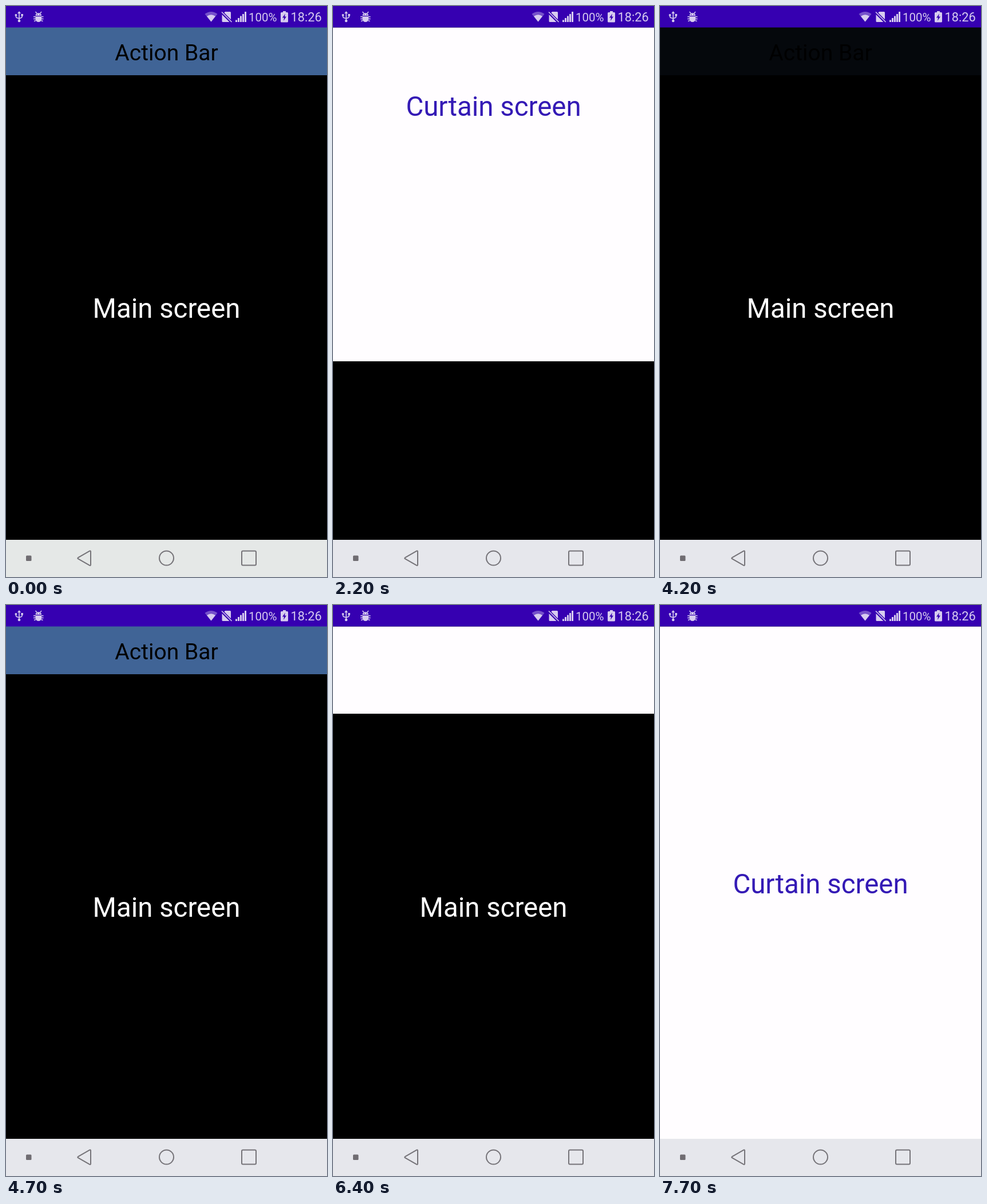
Recreate the animation shown at these times as an HTML page. Size 561x998 px, loop 8 s.

```html
<!DOCTYPE html>
<html lang="en">
<head>
<meta charset="utf-8">
<title>Curtain screen</title>
<style>
  html, body { margin: 0; width: 100%; height: 100%; overflow: hidden; background: #000; }
  svg { display: block; width: 561px; height: 998px; font-family: Roboto, sans-serif; }
</style>
</head>
<body>
<svg viewBox="0 0 561 998">
  <defs><clipPath id="stage"><rect y="37.5" width="561" height="895.5"/></clipPath></defs>
  <rect width="561" height="998"/>

  <g text-anchor="middle">
    <text x="280.5" y="545" font-size="47.4" fill="#fff">Main screen</text>
    <g id="bar">
      <rect y="37" width="561" height="84" fill="#406496"/>
      <text x="280.5" y="95" font-size="39">Action Bar</text>
    </g>
    <g clip-path="url(#stage)">
      <g id="curtain">
        <rect y="37" width="561" height="896" fill="#fffdff"/>
        <text x="280.5" y="504" font-size="47.4" fill="#341ab5">Curtain screen</text>
      </g>
    </g>
  </g>

  <rect width="561" height="37.5" fill="#3600b1"/>
  <g fill="#d7ccef">
    <!-- usb -->
    <path d="M23 9l3 4h-6zM26.3 14h3.6v3.6h-3.6z"/>
    <circle cx="17.4" cy="15.8" r="1.9"/>
    <circle cx="23" cy="26" r="2.3"/>
    <path d="M23 12V25M17.4 16V18.6Q17.4 20.2 19 20.6L23 22M28.1 17V18.6Q28.1 20.2 26.5 20.6L23 22" fill="none" stroke="#d7ccef" stroke-width="1.6"/>
    <!-- debug bug -->
    <path d="M51.5 17a5.3 4.8 0 0 1 10.6 0zM51.5 18.2h10.6v4.5a5.3 5.3 0 0 1-10.6 0z"/>
    <path d="M54 13L51.5 10M59.6 13L62 10M48 18.8h4M61.5 18.8h4M48 22.5h4M61.5 22.5h4M52 25.5l-3 1M61.5 25.5l3 1" stroke="#d7ccef" stroke-width="1.5"/>
    <circle cx="54.6" cy="15" r=".8" fill="#3600b1"/>
    <circle cx="59" cy="15" r=".8" fill="#3600b1"/>
    <!-- wifi -->
    <path d="M358.5 27.5L347.5 14Q358.5 6 369.5 14z" opacity=".4"/>
    <path d="M358.5 27.5L351 18Q358.5 12.5 366 18z"/>
    <!-- no sim -->
    <path d="M383 10H391.5Q393 10 393 11.5V23.5L381.3 11.8zM377.5 15L390.5 28H379Q377.5 28 377.5 26.5z"/>
    <path d="M377 10.5L394.5 28" stroke="#d7ccef" stroke-width="1.6"/>
    <!-- signal -->
    <path d="M401 24.5h3V28h-3zM405 21h3v7h-3zM409 17.5h3V28h-3zM413 14h3v14h-3zM417 10h3v18h-3z"/>
    <!-- battery -->
    <path d="M484 9h5v2h2.5q1.5 0 1.5 1.5V27q0 1.5-1.5 1.5h-10q-1.5 0-1.5-1.5V12.5q0-1.5 1.5-1.5H484z"/>
    <path d="M488 13.5L483 20.5H486L485 26L490 18.5H487z" fill="#3600b1"/>
    <text x="424" y="27" font-size="20.5">100%</text>
    <text x="497.5" y="27" font-size="21.8">18:26</text>
  </g>

  <rect id="nav" y="933" width="561" height="65"/>
  <rect x="35" y="960.5" width="9.5" height="9.5" rx="1.5" fill="#706d72"/>
  <g fill="none" stroke="#757378" stroke-width="2" stroke-linejoin="round">
    <path d="M126 964.2L146 952.6Q148 951.6 148 953.6V976.6Q148 978.6 146 977.6L126 966.2Q124.6 965.2 126 964.2z"/>
    <circle cx="280.5" cy="965" r="12.5"/>
    <rect x="412" y="952.5" width="25" height="25" rx="2"/>
  </g>
</svg>
<script>
const LOOP = 8000, STEP = 100, CLOSED = 37, OPEN = 933;
const [bar, curtain, nav] = ['bar', 'curtain', 'nav'].map(id => document.getElementById(id));

// Finger drags: [time, lower edge of the curtain]
const drag = [
  [0, CLOSED], [1000, CLOSED], [1100, 41], [1300, 62], [1500, 100], [1800, 185],
  [2000, 270], [2100, 380], [2200, 621], [2300, OPEN],
  [3300, OPEN], [3500, 890], [3800, 720], [4000, 420], [4100, CLOSED],
  [5600, CLOSED], [5700, 39], [6000, 72], [6200, 115], [6600, 265], [7000, 387], [7100, 394]
];
const clamp = x => Math.min(1, Math.max(0, x));
const progress = (t, start, length) => clamp((t - start) / length);
const smooth = x => (1 - Math.cos(Math.PI * x)) / 2;
const mix = (a, b, x) => a + (b - a) * x;

function edgeAt(t) {
  if (t >= 7100) return mix(394, OPEN, 1 - (1 - progress(t, 7100, 600)) ** 3);
  const i = drag.findIndex(([time]) => time > t);
  const [t0, y0] = drag[i - 1], [t1, y1] = drag[i];
  return mix(y0, y1, (t - t0) / (t1 - t0));
}

function barOpacity(t) {
  const fade = start => smooth(progress(t, start, 500));
  return 1 - fade(690) + fade(4110) - fade(5310);
}

function draw() {
  const t = Math.floor(performance.now() % LOOP / STEP) * STEP;
  curtain.setAttribute('transform', `translate(0 ${Math.round(edgeAt(t)) - OPEN})`);
  bar.setAttribute('opacity', clamp(barOpacity(t)));
  nav.setAttribute('fill', t < 500 ? '#e5e8e7' : '#e6e7ec');
  requestAnimationFrame(draw);
}
draw();
</script>
</body>
</html>
```
